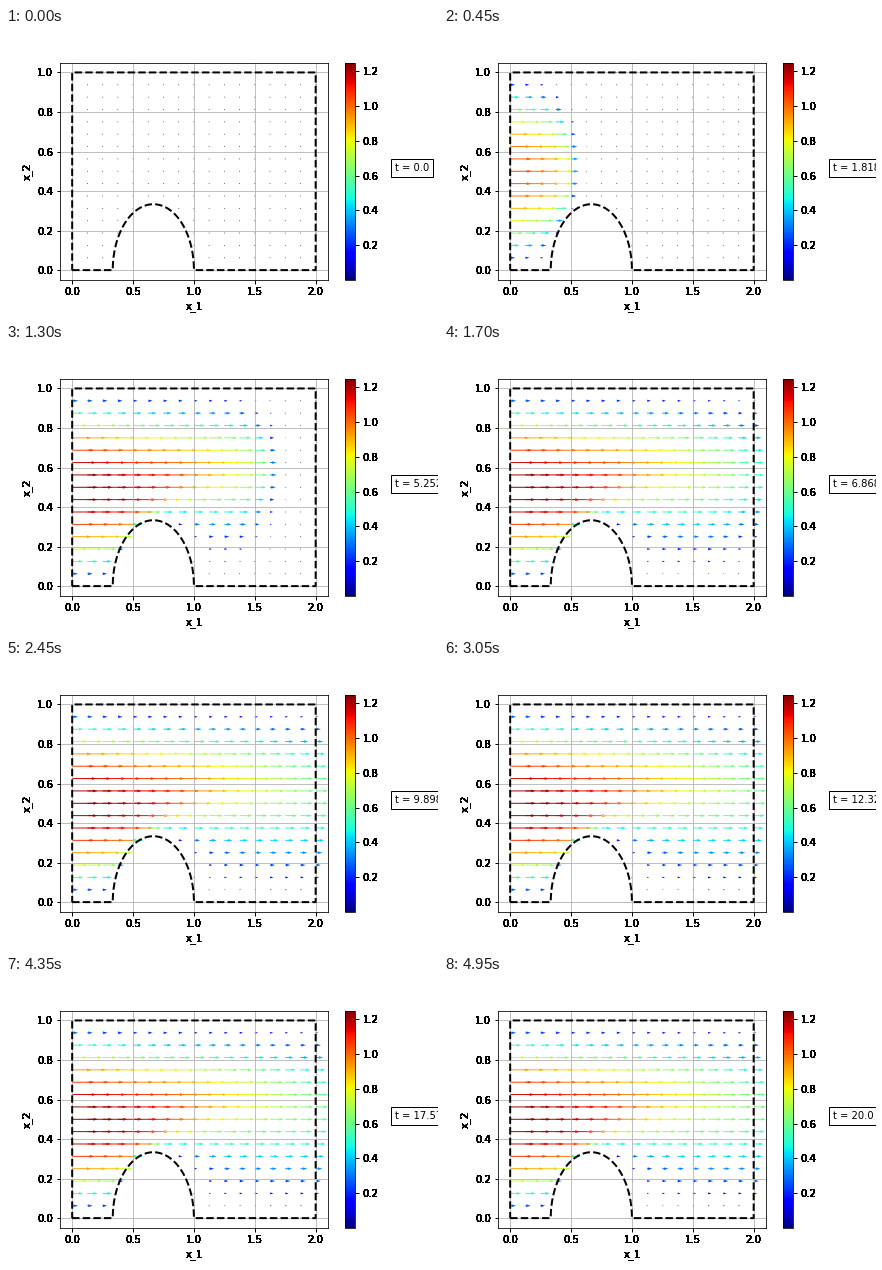
A matplotlib script that plays this animation: 432 px wide and 288 px high, repeating every 5000 ms.

```python
import numpy as np
import matplotlib.pyplot as plt
from matplotlib.animation import FuncAnimation

FRAMES = 100
T_END = 20
U_MAX = 1.25
NU = 0.02             # viscosity
SUBSTEPS = 40
CENTER, RADIUS = 2 / 3, 1 / 3

times = np.linspace(0, T_END, FRAMES)


def solve():
    """Viscous Burgers flow past a half-circle; one coarse field per frame."""
    x, y = np.linspace(0, 2, 65), np.linspace(0, 1, 33)
    h = x[1]
    X, Y = np.meshgrid(x, y)
    solid = (X - CENTER) ** 2 + Y ** 2 <= RADIUS ** 2 + 1e-9
    inlet = 4 * U_MAX * y * (1 - y)
    dt = times[1] / SUBSTEPS
    u = np.zeros_like(X)
    fields = [u[::2, ::4].copy()]
    for step in range(1, (FRAMES - 1) * SUBSTEPS + 1):
        flux = u ** 2 / 2
        mid = u[1:-1, 1:-1]
        lap = (u[1:-1, 2:] + u[1:-1, :-2] + u[2:, 1:-1] + u[:-2, 1:-1]
               - 4 * mid) / h ** 2
        adv = (flux[1:-1, 2:] - flux[1:-1, :-2]) / (2 * h)
        u[1:-1, 1:-1] = mid + dt * (NU * lap - adv)
        u[solid] = 0
        u[:, 0] = inlet * (1 - np.exp(-step * dt))
        u[:, -1] = u[:, -2]
        if step % SUBSTEPS == 0:
            fields.append(u[::2, ::4].copy())
    return X[::2, ::4], Y[::2, ::4], ~solid[::2, ::4], fields


def harden(text, passes=24):
    """Draw a label repeatedly so its soft edges turn solid."""
    draw = text.draw

    def draw_all(renderer):
        for _ in range(passes):
            draw(renderer)

    text.draw = draw_all


X, Y, fluid, fields = solve()

fig = plt.figure(figsize=(6, 4), dpi=72, facecolor="white")
fig.subplots_adjust(bottom=0.125)
ax = fig.add_subplot()
ax.grid(True)

zero = np.zeros(fluid.sum())
arrows = ax.quiver(X[fluid], Y[fluid], zero, zero, zero, cmap="jet",
                   clim=(0, U_MAX), scale=13, width=0.06 / 17)
bar = fig.colorbar(arrows, ax=ax, ticks=np.arange(1, 7) * 0.2)

# Domain outline with the half-circle obstacle
angle = np.linspace(np.pi, 0, 100)
edge_x = np.r_[0, CENTER + RADIUS * np.cos(angle), 2, 2, 0, 0]
edge_y = np.r_[0, RADIUS * np.sin(angle), 0, 1, 1, 0]
ax.plot(edge_x, edge_y, "k--", lw=2)

ax.set(xlim=(-0.1, 2.1), ylim=(-0.05, 1.05), xlabel="x_1", ylabel="x_2",
       xticks=np.arange(5) * 0.5, yticks=np.arange(6) * 0.2)
for axes in (ax, bar.ax):
    axes.tick_params(width=1)
for label in (*ax.get_xticklabels(), *ax.get_yticklabels(),
              *bar.ax.get_yticklabels(), ax.xaxis.label, ax.yaxis.label):
    harden(label)

clock = ax.text(1.25, 0.5, "t = 0.0", transform=ax.transAxes,
                bbox=dict(facecolor="white", edgecolor="black"))


def update(i):
    u = fields[i][fluid]
    arrows.set_UVC(u, zero, u)
    clock.set_text(f"t = {times[i]}")
    return arrows, clock


anim = FuncAnimation(fig, update, frames=FRAMES, interval=50, repeat=True)
plt.show()
```
